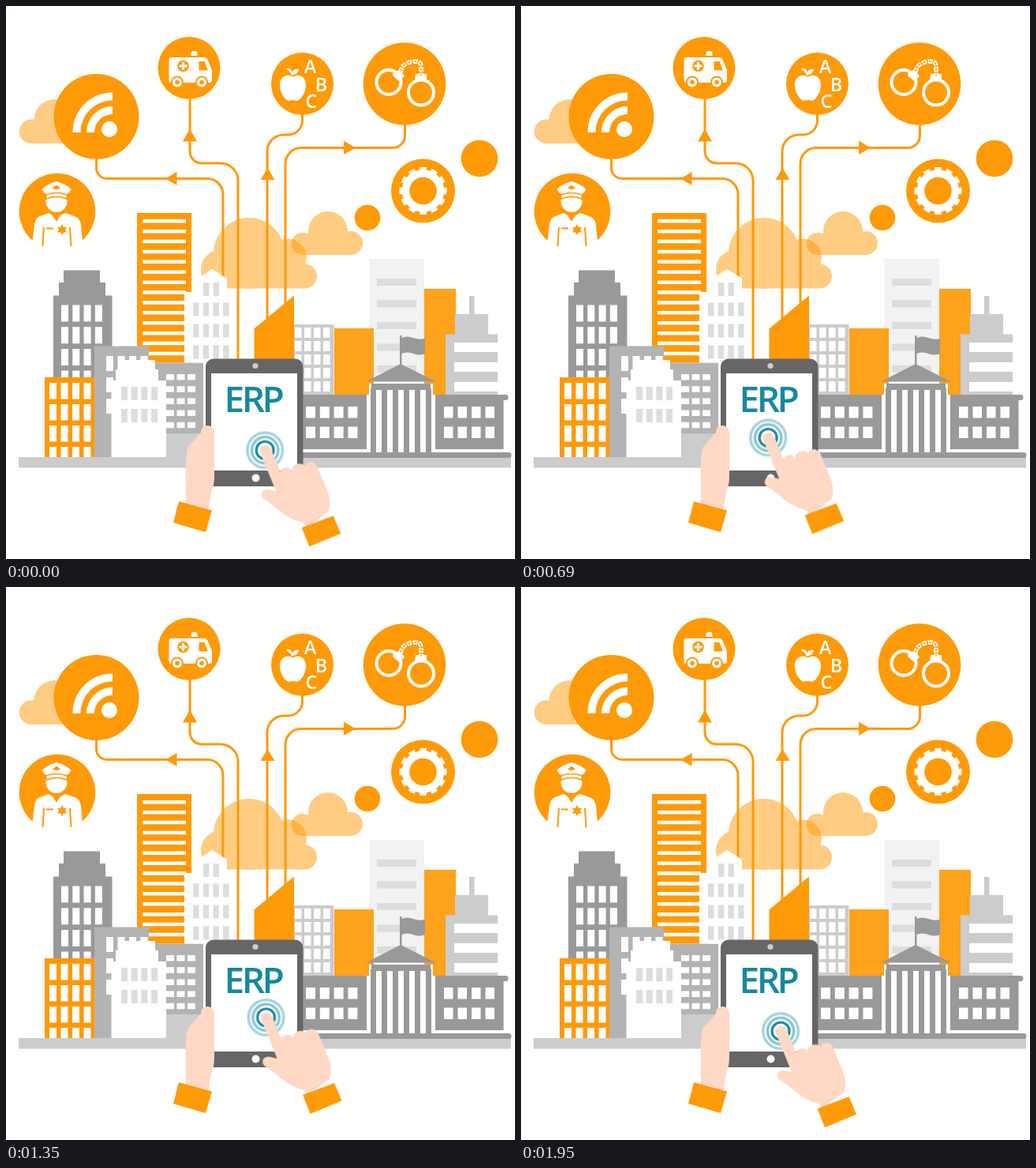
Animation, 645 px wide and 700 px high, one loop 1980 ms. Source, as an HTML page:

```html
<!DOCTYPE html>
<html lang="en">
<head>
<meta charset="utf-8">
<title>City services on a tablet</title>
<style>
html, body { margin: 0; width: 100%; height: 100%; overflow: hidden; background: #fff; }
svg { display: block; width: 645px; height: 700px; }
.o { fill: #ff9a08; }
.w { fill: #fff; }
.dark { fill: #999; }
.mid { fill: #b3b3b3; }
.light { fill: #ccc; }
.pane { fill: #ddd; }
.skin { fill: #ffd8c6; }
.cloud { opacity: .5; }
.ol { fill: none; stroke: #ff9a08; stroke-width: 3; }
.wl { fill: none; stroke: #fff; }
.abc { fill: #fff; font: 600 23.5px "Open Sans", "Noto Sans", sans-serif; text-anchor: middle; }
.title { fill: #16899d; font: 600 46px "Open Sans", "Noto Sans", sans-serif; letter-spacing: -3.5px; }

/* Figure-eight path: one sideways swing for every two dips */
#swing { animation: swing 1980ms -315ms infinite; animation-timing-function: cubic-bezier(.35, .2, .65, .8); }
#dip { animation: dip 1980ms infinite; animation-timing-function: cubic-bezier(.364, 0, .636, 1); }
@keyframes swing {
  0%, 100% { transform: translateX(335.6px); }
  46.2% { transform: translateX(311.8px); }
}
@keyframes dip {
  0%, 100% { transform: translateY(562.3px); }
  24% { transform: translateY(538.4px); }
  52.5% { transform: translateY(563.4px); }
  75.8% { transform: translateY(539px); }
}
</style>
</head>
<body>
<svg viewBox="0 0 645 700">
  <!-- clouds -->
  <g class="o cloud">
    <path d="M75 174H32A15 15 0 0 1 32 143.500H35.500A26 26 0 0 1 75 122Z"/>
  </g>
  <g class="o cloud">
    <circle cx="308" cy="313" r="45"/>
    <path d="M268 357.500A24.500 24.500 0 0 1 268 309Z"/>
    <circle cx="357" cy="318.500" r="24"/><circle cx="378.500" cy="342" r="15.500"/>
    <path d="M267.500 320H357L378 340V357.500H267.500Z"/>
  </g>
  <g class="o cloud">
    <circle cx="408" cy="285" r="25"/><circle cx="375.500" cy="301" r="14"/>
    <circle cx="437" cy="300" r="15"/><path d="M375 295L383 288L437 295V315H375Z"/>
  </g>

  <!-- left skyline -->
  <path class="dark" d="M73 334.500H119V350H126V366.500H134.500V480H60V366.500H67V350H73Z"/>
  <path class="w" data-grid="70 378.5 9 21 14.3 27.7 4 4"/>
  <path class="o" d="M166 262H235V451.500H166Z"/>
  <path class="w" data-grid="173 270 55 4.500 0 12.900 1 14"/>
  <path class="mid" d="M112 430.500H181V451.500H250V571H112Z"/>
  <path class="w" data-grid="127 443 9 19 14.500 27 4 3"/>
  <path class="w" data-grid="203 466 10 7.500 13.500 15.200 3 5"/>
  <path class="light" d="M203 541H250V571H203Z"/>
  <path class="o" d="M49 470H112V571H49Z"/>
  <path class="w" data-grid="55 477 9 20.500 14.500 27 4 4"/>
  <path class="w" d="M147 448H189V460H193V474H203V571H133.500V474H139V460H147Z"/>
  <path class="pane" data-grid="146 482 8 17 12.700 28 4 2"/>
  <path class="w" d="M226 362H238V345H244L261 333L280 345V362H287V451.500H226Z"/>
  <path class="pane" data-grid="250 350 7.500 17 12.500 0 2 1"/>
  <path class="pane" data-grid="237 375.5 7.500 17 12.700 27 4 3"/>

  <!-- right skyline -->
  <path class="light" d="M365 403H415.500V492H365Z"/>
  <path class="w" data-grid="366 407 8.500 13 12 17 4 5"/>
  <path d="M460.500 320H530V470H460.500Z" fill="#f2f2f2"/>
  <path class="pane" data-grid="470 345 50 9 0 27.500 1 5"/>
  <path d="M416 408H466V492H416ZM530 358H570V492H530Z" fill="#ffa21c"/>
  <path class="light" d="M587 367H593.500V390H611V415.500H623V492H557V415.500H569V390H587Z"/>
  <path class="w" data-grid="568 426 55 12 0 25 1 3"/>

  <path class="light" d="M16 571H640V584.500H16Z"/>

  <!-- courthouse -->
  <path class="dark" d="M370 492H457V561H370ZM544 492H633A3 3 0 0 1 633 499H630.500V561H544ZM370 565H637A3 3 0 0 1 637 572H370Z"/>
  <path class="w" data-grid="380 507 12 14.500 17.800 25.500 4 2"/>
  <path class="w" data-grid="555 507 11.500 14.500 17.500 25.500 4 2"/>
  <path class="w" d="M460 478H541V565H460Z"/>
  <path class="dark" d="M500 453L545 475.500H456ZM463 478H538V486H463Z"/>
  <path class="dark" data-grid="462 484 7 82 14 0 6 1"/>
  <path class="dark" d="M499 417H501.500V420Q508 417 516 420T531 421V440Q524 443 516 440T501.500 440V455H499Z"/>

  <!-- connections -->
  <path class="ol" d="M114.500 192V205A13.500 13.500 0 0 0 128 218.500H255A20 20 0 0 1 275 238.500V347M233 116V184A15 15 0 0 0 248 199H272A22 22 0 0 1 294 221V448M375.500 136V145A18 18 0 0 1 357.500 163H352A21 21 0 0 0 331 184V397M505.500 149V164A15.500 15.500 0 0 1 490 179.500H374A20 20 0 0 0 354 199.500V380"/>
  <path class="o" d="M202 218.500L216.500 210V227ZM233 155.500L242 171.500H224ZM331.500 205L340.500 220H322.500ZM443 179.500L428 170.500V188Z"/>
  <path class="o" d="M314.500 408.500L365 366.500V448H314.500Z"/>
  <path class="w" d="M242 345H244L261 333L280 345V349H242Z"/>

  <!-- badges -->
  <g class="o">
    <circle cx="114.500" cy="140" r="54"/><circle cx="232" cy="78.500" r="39.500"/>
    <circle cx="375.500" cy="98.500" r="39.500"/><circle cx="505" cy="98.500" r="52.300"/>
    <circle cx="528.500" cy="234" r="40.500"/><circle cx="600" cy="193" r="23.300"/>
    <circle cx="458" cy="268" r="16.300"/><circle cx="65" cy="260" r="48.300"/>
  </g>

  <!-- signal -->
  <path class="wl" stroke-width="10" d="M89.500 160A45.500 45.500 0 0 1 135 114.500M107 160A28 28 0 0 1 135 132"/>
  <circle cx="131" cy="156" r="11.500" class="o"/><circle cx="131" cy="156" r="10" class="w"/>

  <!-- ambulance -->
  <path class="w" d="M210 65H251Q254 65 255.500 68L261 81V94Q261 97 258 97H209Q206.500 97 206.500 94V69Q206.500 65 210 65ZM234.500 63V60Q234.500 57 238.500 57T242.500 60V63Z"/>
  <path class="o" d="M244.500 70H251.500L256 81.500H244.500Z"/>
  <circle cx="224.500" cy="76" r="7.300" class="o"/>
  <path class="wl" stroke-width="3" d="M224.500 71V81M219.500 76H229.500"/>
  <g id="wheel"><circle cx="217" cy="96.500" r="8" class="o"/><circle cx="217" cy="96.500" r="6" class="w"/><circle cx="217" cy="96.500" r="2.800" class="o"/></g>
  <use href="#wheel" x="31"/>

  <!-- apple and letters -->
  <path class="w" d="M363.500 90C370 85 380 89 380 100C380 110 373 120 368 120Q363.500 118 359 120C354 120 347 110 347 100C347 89 357 85 363.500 90ZM362 88Q361 83 356 81L355 79Q361 78 363 84Q365 79 371 80Q370 86 364 87Z"/>
  <g class="abc"><text x="385.500" y="84.500">A</text><text x="399.500" y="108">B</text><text x="387" y="128.500">C</text></g>

  <!-- handcuffs -->
  <g class="wl" stroke-width="4">
    <circle cx="485" cy="96.500" r="15.500"/><circle cx="526" cy="109.500" r="16"/>
  </g>
  <path class="w" d="M491 83L500 81L505 89L498 95L490 88ZM519 86H533V95H518Z"/>
  <path class="wl" stroke-width="5.500" stroke-dasharray="6 1.500" d="M500 84Q501 73 514 70.500T526 78V88"/>
  <path class="ol" style="stroke-width:1.500" stroke-dasharray="3.500 4" stroke-dashoffset="-1.200" d="M500 84Q501 73 514 70.500T526 78V88"/>

  <!-- gear -->
  <circle class="wl" cx="528.500" cy="234" r="22" stroke-width="9.500"/>
  <circle class="wl" cx="528.500" cy="234" r="27.800" stroke-width="4.500" pathLength="24" stroke-dasharray="1.150 .850" stroke-dashoffset=".58"/>

  <!-- officer -->
  <circle cx="64" cy="247.500" r="13.500" class="w"/>
  <path class="o" d="M48 236H80L78.500 246Q64 238.500 49.500 246Z"/>
  <path class="w" d="M64 222Q77 226 82.500 232Q81 236 77 238Q64 233 51 238Q47 236 45.500 232Q51 226 64 222ZM51.500 239.500Q64 235 76.500 239.500V243Q64 238 51.500 243Z"/>
  <path class="o" d="M64 226.500L69 230.500L64 232.500L59 230.500Z"/>
  <path class="w" d="M54 262L64 268L75 262L89 267Q94 270 95 277L98 310H32L36 277Q37 270 41 267Z"/>
  <path class="ol" style="stroke-width:2" d="M48 280L46.500 304M81 280L82.500 304M51 281.500H60"/>
  <path class="o" d="M58 263.500L64 267L70 263.500L64 273Z"/>
  <path class="o" d="M71 276L73 280H77L75 283L77 286.500H73L71 290L69 286.500H65L67 283L65 280H69Z"/>

  <!-- tablet -->
  <rect x="253" y="446.500" width="123.500" height="161.500" rx="10" fill="#666"/>
  <path class="w" d="M260 465H369V588H260Z"/>
  <circle cx="316" cy="455.500" r="3.600" class="light"/>
  <circle cx="316.500" cy="597.500" r="5" class="w"/>
  <text class="title" x="276.500" y="514">ERP</text>

  <!-- holding hand -->
  <path class="skin" d="M247 540C247 528 264 528 264 541V596Q264 606 260 615L256 640L228 632L227.500 590Q228 563 231 558Z"/>
  <path class="o" d="M219 627L261 638.500L253 666L212 654Z"/>

  <!-- tapping hand, drawn around the fingertip -->
  <g id="swing"><g id="dip">
    <g fill="none">
      <circle r="22.300" stroke="#a6d4dc" stroke-width="3.600"/>
      <circle r="16.700" stroke="#8ac6d0" stroke-width="3.600"/>
      <circle r="11" stroke="#16899d" stroke-width="3.200"/>
    </g>
    <path class="skin" d="M-6 3C-9-7 5-10 8-1L19 27C23 20 32 21 34 26C35 17 45 14 51 20C53 12 63 14 66 20L79 51Q85 66 80 78L54 97L48 92Q28 87 12 71L-1 62C-8 56-3 48 5 50L14 52Z"/>
    <path class="o" d="M46.500 98L86.500 83L96 105.500L56 122Z"/>
  </g></g>
</svg>
<script>
// Each grid lists: x y width height stepX stepY columns rows
for (const el of document.querySelectorAll('[data-grid]')) {
  const [x, y, w, h, dx, dy, cols, rows] = el.dataset.grid.split(' ').map(Number);
  let d = '';
  for (let r = 0; r < rows; r++)
    for (let c = 0; c < cols; c++)
      d += `M${x + c * dx} ${y + r * dy}h${w}v${h}h${-w}z`;
  el.setAttribute('d', d);
}
</script>
</body>
</html>
```
